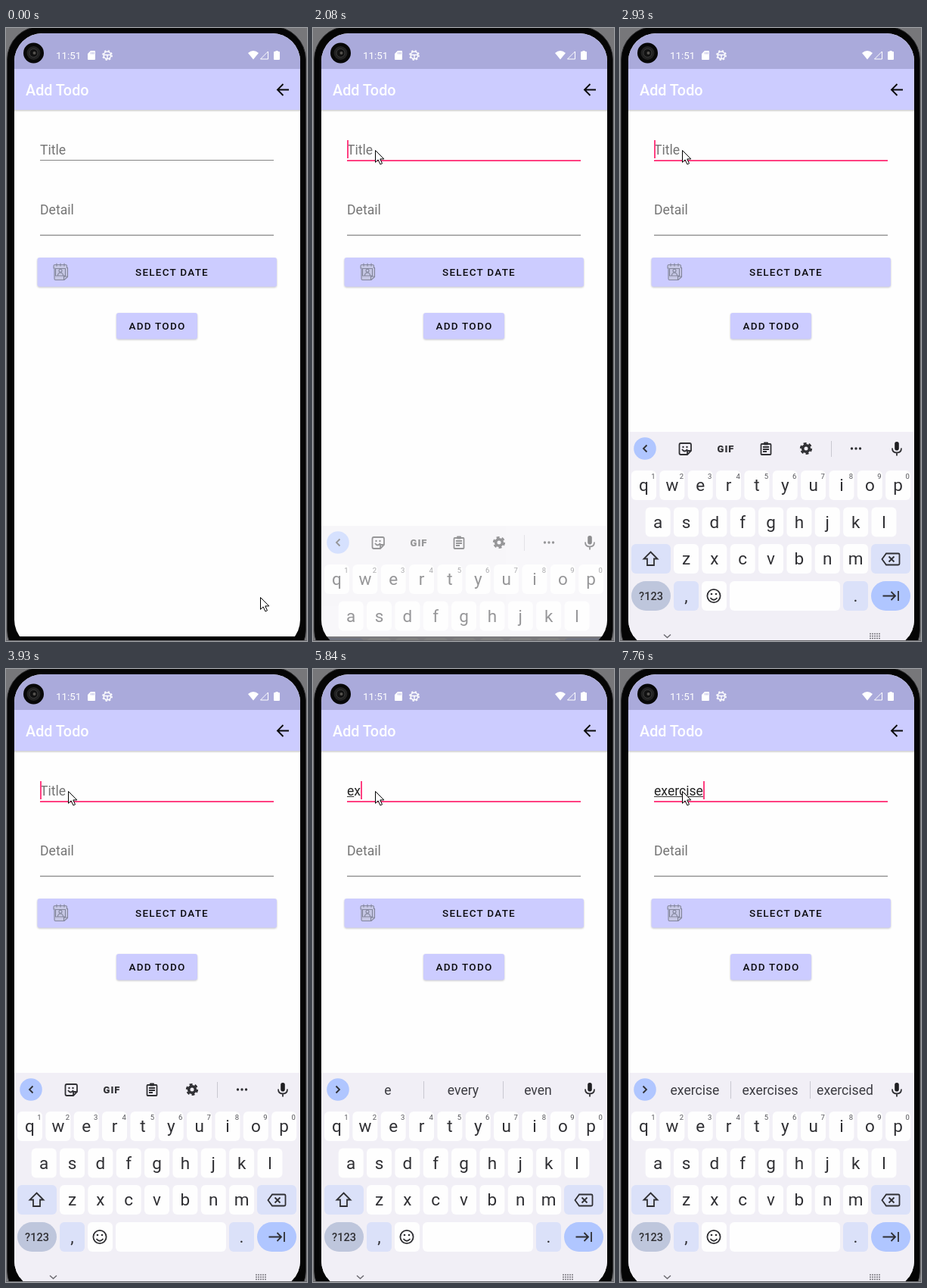
These frames come from a looping animation (398x809 px, 8000 ms). An HTML page:

```html
<!DOCTYPE html>
<html lang="en">
<head>
<meta charset="utf-8">
<title>Add Todo</title>
<style>
html, body { margin: 0; width: 100%; height: 100%; overflow: hidden; background: #000; }
svg { display: block; width: 398px; height: 809px; font-family: Roboto, "Open Sans", sans-serif; }
.field { font-size: 17.6px; fill: #757575; }
.button { font-size: 13.5px; font-weight: 500; letter-spacing: 1.25px; fill: #0c0c10; }
.raised { fill: #ccccff; filter: drop-shadow(0 1px 1px rgba(0,0,0,.22)); }
.mid { text-anchor: middle; }
.letter { font-size: 22.5px; fill: #303034; }
.digit { font-size: 9.5px; fill: #55555a; }
.hint { font-size: 17.6px; fill: #3c3c42; }
.line { fill: none; stroke: #303034; stroke-width: 1.8; }
.fine { fill: none; stroke: #83869c; stroke-width: 1.1; }
.pink { fill: #ff4081; }
</style>
</head>
<body>
<svg viewBox="0 0 398 809">
  <defs>
    <clipPath id="screen"><rect x="11" y="7" width="378" height="811" rx="37"/></clipPath>
    <linearGradient id="shade" x2="0" y2="1">
      <stop stop-color="#000" stop-opacity=".2"/><stop offset="1" stop-color="#000" stop-opacity="0"/>
    </linearGradient>
  </defs>

  <rect width="398" height="809" fill="#77777a"/>
  <rect x="1.500" y="-2" width="395" height="840" rx="44" fill="#050505" stroke="#2c2c2e"/>

  <g clip-path="url(#screen)">
    <rect x="11" y="7" width="378" height="811" fill="#000"/>
    <rect x="11" y="7" width="378" height="796" fill="#fefefe"/>
    <rect x="11" y="7" width="378" height="47" fill="#aaaadb"/>
    <rect x="11" y="54" width="378" height="54" fill="#ccccff"/>
    <rect x="11" y="108" width="378" height="3" fill="url(#shade)"/>

    <!-- status bar -->
    <circle cx="36.500" cy="33" r="13.500" fill="#080808"/>
    <circle cx="36.500" cy="33" r="9" fill="#222"/>
    <circle cx="36.500" cy="33" r="5.500" fill="#111" stroke="#3a3a3a"/>
    <circle cx="37.500" cy="33" r="2" fill="#55534f"/>
    <text x="66" y="41" font-size="13.400" fill="#fff">11:51</text>
    <path d="M112 30h5q1 0 1 1v10q0 1-1 1h-8q-1 0-1-1v-7z" fill="#fff"/>
    <path d="M112.500 32v2.500M114.500 32v2.500M116.300 32v2.500" stroke="#aaaadb" stroke-width=".8"/>
    <g fill="none" stroke="#fff">
      <circle cx="134" cy="36" r="4.800" stroke-width="1.500"/>
      <circle cx="134" cy="36" r="6.200" stroke-width="1.400" stroke-dasharray="2.400 2.470"/>
      <path d="M129.500 35.500h9M134 36v5" stroke-width="1.400"/>
    </g>
    <path d="M320 33q7-6 14 0l-7 8.500z" fill="#fff"/>
    <path d="M346.500 31v10h-10z" fill="none" stroke="#fff"/>
    <path d="M356.500 30h3v1h1.500q1 0 1 1v9q0 1-1 1h-6q-1 0-1-1v-9q0-1 1-1h1.500z" fill="#fff"/>

    <!-- app bar -->
    <text x="26" y="89" font-size="19.800" font-weight="500" fill="#fff">Add Todo</text>
    <path d="M374 81.500h-14M366.500 74l-7.500 7.500 7.500 7.500" fill="none" stroke="#0a0a0a" stroke-width="1.900"/>

    <!-- form -->
    <text id="title" class="field" x="45" y="167">Title</text>
    <rect id="compose" x="45" y="168" width="0" height="1" fill="#333"/>
    <rect id="rule" x="45" y="174" width="309" height="1" fill="#858585"/>
    <rect id="caret" class="pink" y="148" width="2" height="24"/>
    <text class="field" x="45" y="246">Detail</text>
    <rect x="45" y="272.800" width="309" height="1.300" fill="#8a8a8a"/>
    <rect class="raised" x="41.500" y="303" width="316.500" height="38.500" rx="3"/>
    <text class="button" x="171" y="327">SELECT DATE</text>
    <g class="fine">
      <path d="M64.500 312.500h14.500q1.500 0 1.500 1.500v2.500h1v12l-4.500 4h-11.500q-1.500 0-1.500-1.500v-14h-1v-3q0-1.500 1.500-1.500z" fill="#c6c7e4"/>
      <path d="M81 328h-4.500v4M67 310.500v4M72 310.500v4M77 310.500v4M65.500 317.500h13v9.500h-13z"/>
      <circle cx="72" cy="320.300" r="2"/>
      <path d="M68.500 327q0-4 3.500-4t3.500 4"/>
    </g>
    <rect class="raised" x="146" y="376" width="107" height="34.500" rx="3"/>
    <text class="button" x="162.500" y="398">ADD TODO</text>

    <!-- keyboard -->
    <g id="board">
      <rect x="11" y="533" width="378" height="410" fill="#f1eff6"/>
      <circle cx="33" cy="555" r="14.800" fill="#b0c6ff"/>
      <path id="chevron" d="M35.500 550.500l-4.500 4.500 4.500 4.500" class="line"/>
      <g id="tools">
        <g class="line">
          <path d="M80.500 548h11.500q2 0 2 2v8l-5 5h-8.500q-2 0-2-2v-11q0-2 2-2zM94 558h-5v5M82 556q3.500 5 7 0"/>
          <path d="M187.500 549h11q1 0 1 1v12q0 1-1 1h-11q-1 0-1-1v-12q0-1 1-1zM189 553h8M189 556h8M189 559h5"/>
          <circle cx="246" cy="555" r="4.300" stroke-width="3.600"/>
          <circle cx="246" cy="555" r="6.800" stroke-width="2.600" stroke-dasharray="3.900 3.221"/>
        </g>
        <g fill="#303034">
          <circle cx="83.500" cy="553" r="1.200"/><circle cx="88.500" cy="553" r="1.200"/>
          <rect x="190" y="546.500" width="6" height="4" rx="1"/>
          <text class="mid" x="140" y="560" font-size="13" font-weight="900" letter-spacing="1">GIF</text>
          <circle cx="306.500" cy="555" r="1.700"/><circle cx="312" cy="555" r="1.700"/><circle cx="317.500" cy="555" r="1.700"/>
        </g>
        <rect x="279" y="545" width="1" height="21" fill="#c9c8d0"/>
      </g>
      <g id="hints">
        <rect x="146" y="544" width="1" height="23" fill="#c9c8d0"/>
        <rect x="251" y="544" width="1" height="23" fill="#c9c8d0"/>
        <text class="hint mid" x="99" y="562"></text>
        <text class="hint mid" x="198.500" y="562"></text>
        <text class="hint mid" x="297.500" y="562"></text>
      </g>
      <rect x="363.200" y="546" width="5.600" height="11.500" rx="2.800" fill="#1f1f22"/>
      <path d="M360 554.500q0 6 6 6t6-6M366 560.500v4" class="line"/>
      <g id="keys"></g>
      <g class="line">
        <path d="M40.500 691.500l9 9h-4.500v8.500h-9v-8.500h-4.500z"/>
        <path d="M352 693.500h16q1.500 0 1.500 1.500v12q0 1.500-1.500 1.500h-16l-5.500-7.500zM355.500 697.500l7 7M362.500 697.500l-7 7"/>
        <circle cx="124" cy="749.500" r="8.600"/>
        <path d="M119.500 752q4.500 5.500 9 0"/>
        <path d="M347.500 749.500h16M358.500 744l5.500 5.500-5.500 5.500M368 743v13"/>
        <path d="M58 800.500l4.500 4 4.500-4" stroke="#6d6c72" stroke-width="1.500"/>
      </g>
      <circle cx="121" cy="747" r="1.300" fill="#303034"/><circle cx="127" cy="747" r="1.300" fill="#303034"/>
      <path d="M330 799.500h14M330 802.500h14M330 805.500h14" stroke="#77767c" stroke-width="1.700" stroke-dasharray="2 1"/>
    </g>
  </g>
  <rect y="808" width="398" height="1" fill="#66666a"/>

  <path id="pointer" d="M.5.500v15.800l3.600-3.400 2.800 6 2.600-1.100-2.700-5.900h5z" fill="#fff" stroke="#000"/>
</svg>
<script>
const LOOP = 8000, PITCH = 37.35;
const $ = id => document.getElementById(id);
const show = (id, on) => { $(id).style.display = on ? "" : "none"; };

// Each track lists [start time, values...].
const pointer = [[0, 336, 751], [710, 324, 442], [860, 256, 338], [980, 186, 250],
  [1130, 123, 182], [1250, 87, 143], [1400, 84, 154], [1520, 82, 161]];
const board = [[0, 0, 0], [2080, 124, .5], [2200, 1, .9], [2340, 0, 1]];
const blink = [[0, 0], [1930, 1], [2480, 0], [2930, 1], [3470, 0], [3930, 1], [4490, 0], [5050, 1]];
// typed letters, letters already composed
const typing = [[0, 0, 0], [5450, 1, 0], [5570, 1, 1], [5840, 2, 1], [5960, 3, 2], [6240, 3, 3],
  [6800, 4, 3], [7100, 5, 4], [7220, 6, 5], [7470, 7, 6], [7620, 8, 7], [7760, 8, 8]];
const word = "exercise";
const guesses = { 1: ["every", "even"], 2: ["example", "excited"], 3: ["exercise", "executive"],
  8: ["exercises", "exercised"] };

const at = (track, t) => track.filter(step => step[0] <= t).pop().slice(1);

function key(x, y, w, fill, label = "", digit = "", round = 6) {
  const mid = x + w / 2;
  let out = `<rect x="${x}" y="${y}" width="${w}" height="39" rx="${round}" fill="${fill}"/>`;
  if (label) out += `<text class="letter mid" x="${mid}" y="${y + 27}">${label}</text>`;
  if (digit) out += `<text class="digit mid" x="${mid + 12.5}" y="${y + 11}">${digit}</text>`;
  return out;
}
const row = (letters, x, y, digits = "") =>
  [...letters].map((c, i) => key(x + i * PITCH, y, 33, "#fefefe", c, digits[i])).join("");

$("keys").innerHTML = row("qwertyuiop", 15, 584, "1234567890") + row("asdfghjkl", 33.7, 632.5) +
  key(15, 681, 52, "#dbe1f9") + row("zxcvbnm", 71, 681) + key(332, 681, 52, "#dbe1f9") +
  key(15, 730, 52, "#bec6dc", "", "", 19.5) + key(71, 730, 33, "#dbe1f9", ",") +
  key(108, 730, 33, "#fefefe") + key(145, 730, 146, "#fefefe") +
  key(295, 730, 33, "#dbe1f9", ".") + key(332, 730, 52, "#b0c6ff", "", "", 19.5) +
  `<text class="mid" x="41" y="755" font-size="14.500" font-weight="500" fill="#303034">?123</text>`;

const hintTexts = $("hints").querySelectorAll("text");

function draw(t) {
  const [px, py] = at(pointer, t), [drop, alpha] = at(board, t);
  const [typed, composed] = at(typing, t), title = $("title"), focused = t >= 1800;

  $("pointer").setAttribute("transform", `translate(${px} ${py})`);
  $("board").setAttribute("transform", `translate(0 ${drop})`);
  $("board").setAttribute("opacity", alpha);

  title.textContent = typed ? word.slice(0, typed) : "Title";
  title.style.fill = typed ? "#252525" : "";
  const width = n => n ? title.getSubStringLength(0, n) : 0;
  $("compose").setAttribute("width", width(composed));
  $("caret").setAttribute("x", 45 + Math.round(width(typed)));
  show("caret", at(blink, t)[0]);
  $("rule").setAttribute("fill", focused ? "#ff4081" : "#858585");
  $("rule").setAttribute("height", focused ? 2 : 1);

  show("tools", !composed);
  show("hints", composed);
  $("chevron").setAttribute("transform", composed ? "rotate(180 33 555)" : "");
  const others = guesses[composed] || ["exercise", "exercises"];
  [word.slice(0, composed), ...others].forEach((text, i) => { hintTexts[i].textContent = text; });
}

function tick() {
  draw(performance.now() % LOOP);
  requestAnimationFrame(tick);
}
tick();
</script>
</body>
</html>
```
